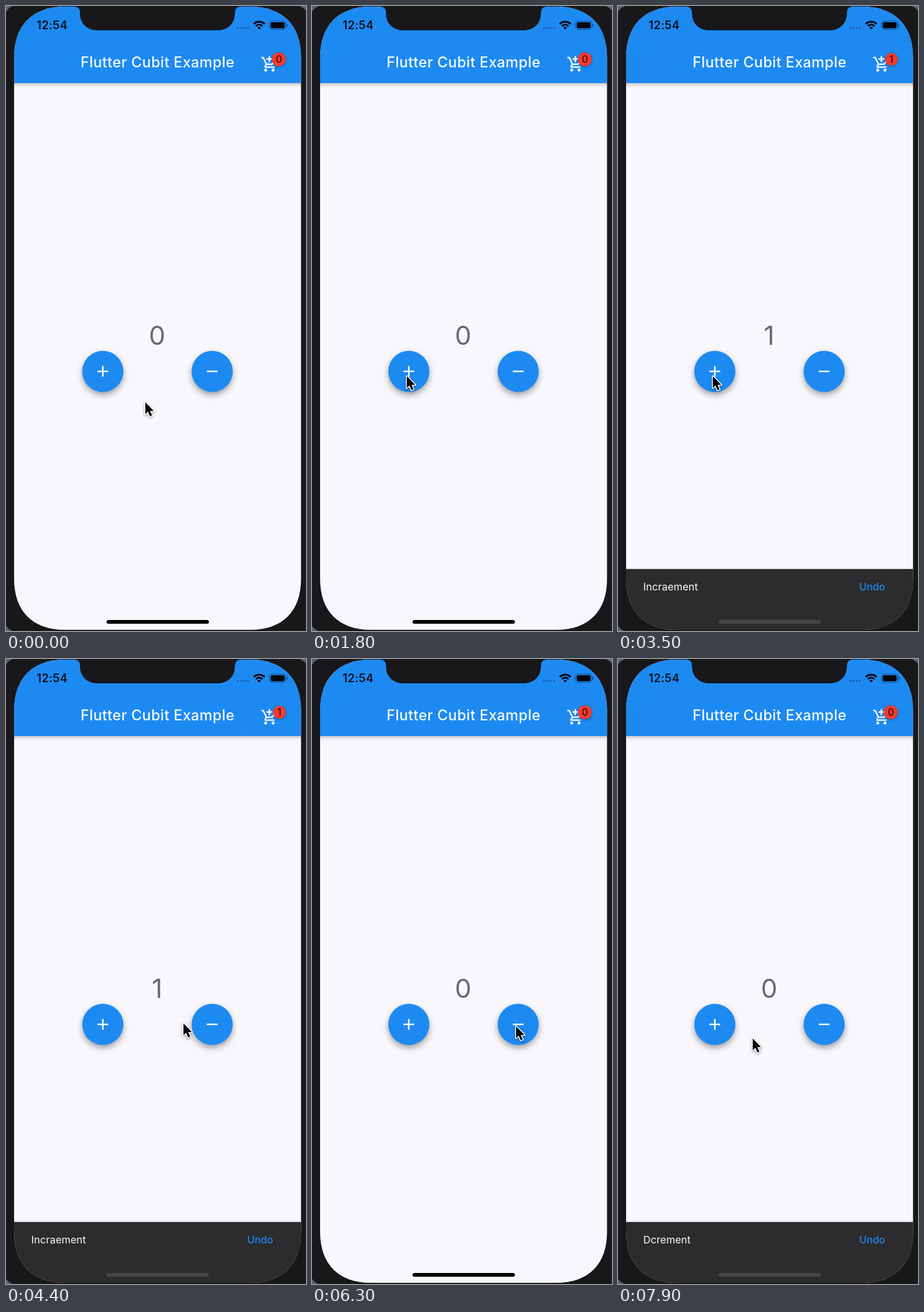
Animation of 519x1079 px, one loop 8000 ms. Source, as an HTML page with a canvas:

```html
<!DOCTYPE html>
<html lang="en">
<head>
<meta charset="utf-8">
<title>Counter app</title>
<style>
  html, body { margin: 0; width: 100%; height: 100%; overflow: hidden; background: #18171a; }
  canvas { display: block; }
</style>
</head>
<body>
<canvas id="stage" width="519" height="1079"></canvas>
<script>
const ctx = document.getElementById('stage').getContext('2d');
const LOOP = 8000, STEP = 100;
const BLUE = '#1d8af2', FONT = 'Inter, Roboto, sans-serif';
const SCREEN = { left: 14, top: 1, right: 510.4, bottom: 1077 };
const SNACK_HEIGHT = 107, SNACK_TIME = 250;

const snacks = [
  { label: 'Incraement', start: 1810, end: 6025 },
  { label: 'Dcrement', start: 6280, end: Infinity }
];
const INCREMENT_AT = 1810, DECREMENT_AT = 6250;

// Each move: start time, end time, from, to
const moves = [
  [0, 300, [240, 682], [163, 637]],
  [3900, 4400, [163, 637], [306, 627]],
  [4400, 4900, [306, 627], [352, 632]],
  [7200, 7900, [352, 632], [232, 653]]
];

const clamp = v => Math.max(0, Math.min(1, v));
const smooth = v => v * v * (3 - 2 * v);

// Cubic bezier (.4, 0, .2, 1), solved by bisection
function fastOutSlowIn(x) {
  let lo = 0, hi = 1;
  for (let i = 0; i < 24; i++) {
    const s = (lo + hi) / 2, r = 1 - s;
    if (1.2 * r * r * s + 0.6 * r * s * s + s * s * s < x) lo = s; else hi = s;
  }
  return 3 * lo * lo - 2 * lo * lo * lo;
}

function fillShape(path, color) {
  ctx.fillStyle = color;
  ctx.fill(path);
}

function circle(x, y, r, color) {
  ctx.beginPath();
  ctx.arc(x, y, r, 0, Math.PI * 2);
  ctx.fillStyle = color;
  ctx.fill();
}

function pill(x, y, w, h, r, color) {
  ctx.beginPath();
  ctx.roundRect(x, y, w, h, r);
  ctx.fillStyle = color;
  ctx.fill();
}

function text(str, x, y, size, weight, color, { align = 'left', spacing = 0 } = {}) {
  ctx.font = `${weight} ${size}px ${FONT}`;
  ctx.textAlign = align;
  ctx.letterSpacing = spacing + 'px';
  ctx.fillStyle = color;
  ctx.fillText(str, x, y);
}

function withShadow(color, blur, dy, draw) {
  ctx.save();
  ctx.shadowColor = color;
  ctx.shadowBlur = blur;
  ctx.shadowOffsetY = dy;
  draw();
  ctx.restore();
}

function screenPath() {
  const { left: l, top: t, right: r, bottom: b } = SCREEN;
  const R = 88, c = 32;
  const p = new Path2D();
  p.moveTo(l + R, t);
  p.lineTo(r - R, t);
  p.bezierCurveTo(r - c, t, r, t + c, r, t + R);
  p.lineTo(r, b - R);
  p.bezierCurveTo(r, b - c, r - c, b, r - R, b);
  p.lineTo(l + R, b);
  p.bezierCurveTo(l + c, b, l, b - c, l, b - R);
  p.lineTo(l, t + R);
  p.bezierCurveTo(l, t + c, l + c, t, l + R, t);
  return p;
}

const screen = screenPath();
const notch = new Path2D('M117 0V1Q128 1 128 12V14A28 28 0 0 0 156 42H368A28 28 0 0 0 396 14V12Q396 1 407 1V0Z');
const corners = new Path2D('M0 0H12Q4 3 0 10ZM519 0H508Q515 3 519 8ZM0 1079H11Q4 1076 0 1070Z');
const cart = new Path2D('M1 3H3.6L8 12H16L20.5 4.3M7.9 12L6.3 15Q5.9 16 7 16H19M8 5H16M12 1V9');
const arrow = new Path2D('M1 2V22.5L5.6 18.3L9.1 26.3L12.7 24.7L9.2 16.9H15.5Z');

function drawStatusBar() {
  text('12:54', 53, 40, 19.5, 600, '#06101c', { spacing: 0.4 });
  for (let i = 0; i < 4; i++) circle(401.5 + i * 5.7, 38, 2, 'rgba(0,20,60,.3)');

  ctx.strokeStyle = '#03070c';
  [[2.2, 4.4], [8.2, 3], [13.4, 3.2]].forEach(([radius, width]) => {
    ctx.lineWidth = width;
    ctx.beginPath();
    ctx.arc(438, 40.5, radius, -Math.PI * 0.75, -Math.PI * 0.25);
    ctx.stroke();
  });

  ctx.lineWidth = 1.2;
  ctx.strokeStyle = 'rgba(0,10,30,.5)';
  ctx.beginPath();
  ctx.roundRect(456, 26, 28, 14.5, 4.5);
  ctx.stroke();
  pill(458, 28, 24, 10.5, 2.8, '#03070c');
  pill(485.3, 31, 1.6, 5, 0.8, 'rgba(0,10,30,.5)');
}

function drawAppBar(count) {
  withShadow('rgba(0,0,0,.28)', 7, 2, () => {
    ctx.fillStyle = BLUE;
    ctx.fillRect(0, 0, 519, 133);
  });
  ctx.fillStyle = 'rgba(0,0,0,.05)';
  ctx.fillRect(420, 62, 1, 70);
  drawStatusBar();
  text('Flutter Cubit Example', 129, 106, 25, 500, '#f7fbff', { spacing: 0.5 });

  ctx.save();
  ctx.translate(440.4, 85.2);
  ctx.scale(1.27, 1.27);
  ctx.strokeStyle = '#f7fbff';
  ctx.lineWidth = 2;
  ctx.stroke(cart);
  circle(7, 20, 2, '#f7fbff');
  circle(17, 20, 2, '#f7fbff');
  ctx.restore();

  const x = count ? 473 : 472;
  withShadow('rgba(0,0,0,.35)', 4, 1, () => circle(x, 92, count ? 11 : 12, '#f43a30'));
  text(count, x, 98, 17, 400, '#1c0504', { align: 'center' });
}

function drawButton(x, y, isPlus) {
  withShadow('rgba(0,0,0,.36)', 11, 5, () => circle(x, y, 35.6, BLUE));
  ctx.fillStyle = '#fff';
  ctx.fillRect(x - 9.3, y - 1.3, 18.6, 2.6);
  if (isPlus) ctx.fillRect(x - 1.3, y - 9.3, 2.6, 18.6);
}

function drawSnack({ label, start, end }, time) {
  const entering = time < end;
  const progress = clamp(entering ? (time - start) / SNACK_TIME : 1 - (time - end) / SNACK_TIME);
  if (!progress) return 0;
  const height = SNACK_HEIGHT * fastOutSlowIn(progress);
  const y = 1079 - height;
  withShadow('rgba(0,0,0,.15)', 4, 0, () => {
    ctx.fillStyle = '#2c2b2d';
    ctx.fillRect(0, y, 519, height);
  });
  ctx.globalAlpha = entering ? clamp((progress - 0.45) / 0.55) : 1;
  text(label, 43.7, y + 36.7, 17.5, 400, '#fff', { spacing: 0.15 });
  text('Undo', 417.3, y + 36.7, 17.5, 500, BLUE);
  ctx.globalAlpha = 1;
  return height;
}

function cursorAt(time) {
  let pos = moves[0][2];
  for (const [start, end, from, to] of moves) {
    if (time < start) break;
    const k = smooth(clamp((time - start) / (end - start)));
    pos = from.map((v, i) => v + (to[i] - v) * k);
  }
  return pos;
}

function drawCursor(time) {
  ctx.save();
  ctx.translate(...cursorAt(time));
  ctx.lineJoin = 'round';
  ctx.lineWidth = 3;
  ctx.strokeStyle = '#fff';
  withShadow('rgba(0,0,0,.4)', 4, 1.5, () => ctx.stroke(arrow));
  fillShape(arrow, '#050506');
  ctx.restore();
}

function draw(time) {
  const count = time >= INCREMENT_AT && time < DECREMENT_AT ? 1 : 0;
  ctx.fillStyle = '#18171a';
  ctx.fillRect(0, 0, 519, 1079);
  fillShape(corners, '#5c626b');

  ctx.save();
  ctx.clip(screen);
  ctx.fillStyle = '#f8f7fb';
  ctx.fillRect(0, 0, 519, 1079);
  drawAppBar(count);
  text(count, 261.5, 584.5, 45, 400, '#69686c', { align: 'center' });
  drawButton(167.5, 630.8, true);
  drawButton(356.7, 630.8, false);
  const covered = Math.max(...snacks.map(s => drawSnack(s, time)));
  pill(174, 1060, 177, 6.5, 3.25, covered > 20 ? '#454447' : '#000');
  ctx.restore();

  fillShape(notch, '#18171a');
  drawCursor(time);
}

function tick() {
  draw(Math.floor((performance.now() % LOOP) / STEP) * STEP);
  requestAnimationFrame(tick);
}
tick();
</script>
</body>
</html>
```
